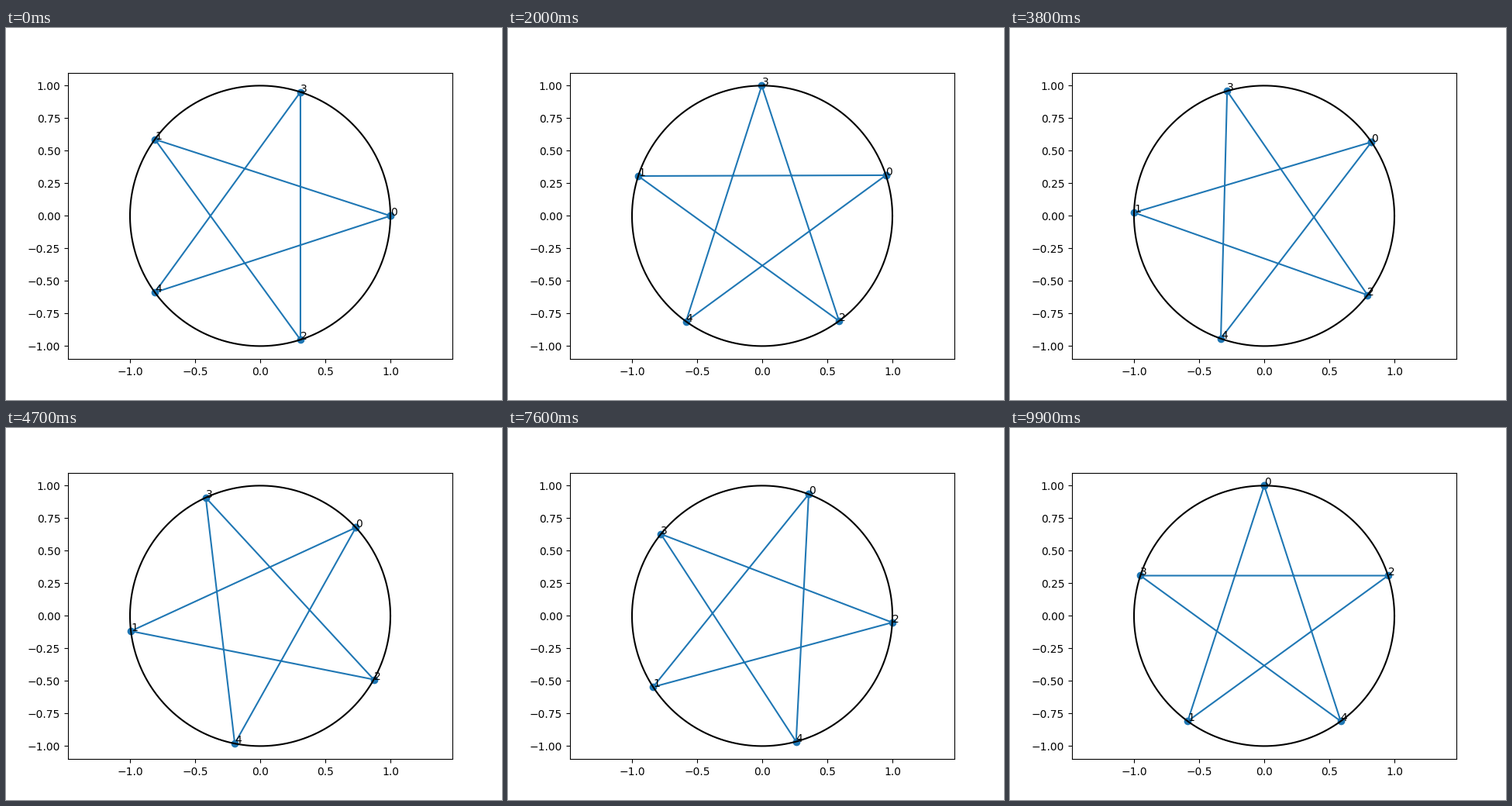
A matplotlib script that plays this animation: 640 px wide and 480 px high, repeating every 10 s.

```python
import numpy as np
import matplotlib.pyplot as plt
from matplotlib.animation import FuncAnimation

FRAMES = 100
POINTS = 5
STEP = 2 * 2 * np.pi / POINTS  # every second corner of the pentagon

plt.rcParams["font.family"] = "DejaVu Sans"
fig, ax = plt.subplots(figsize=(6.4, 4.8), dpi=100)

star, = ax.plot([], [], "o-", color="C0")
t = np.linspace(0, 2 * np.pi, 200)
ax.plot(np.cos(t), np.sin(t), "k")
labels = [ax.text(0, 0, str(k)) for k in range(POINTS)]

ax.set_ylim(-1.1, 1.1)
ax.set_xlim(-1.1 * 496 / 369.6, 1.1 * 496 / 369.6)
ax.set_xticks(np.arange(-1, 1.1, 0.5))
ax.set_yticks(np.arange(-1, 1.1, 0.25))

turns = np.linspace(0, np.pi / 2, FRAMES)


def update(i):
    a = turns[i] + STEP * np.arange(POINTS + 1)
    x, y = np.cos(a), np.sin(a)
    star.set_data(x, y)
    for label, px, py in zip(labels, x, y):
        label.set_position((px, py))
    return [star, *labels]


anim = FuncAnimation(fig, update, frames=FRAMES, interval=100,
                     repeat=True, repeat_delay=0)
plt.show()
```
